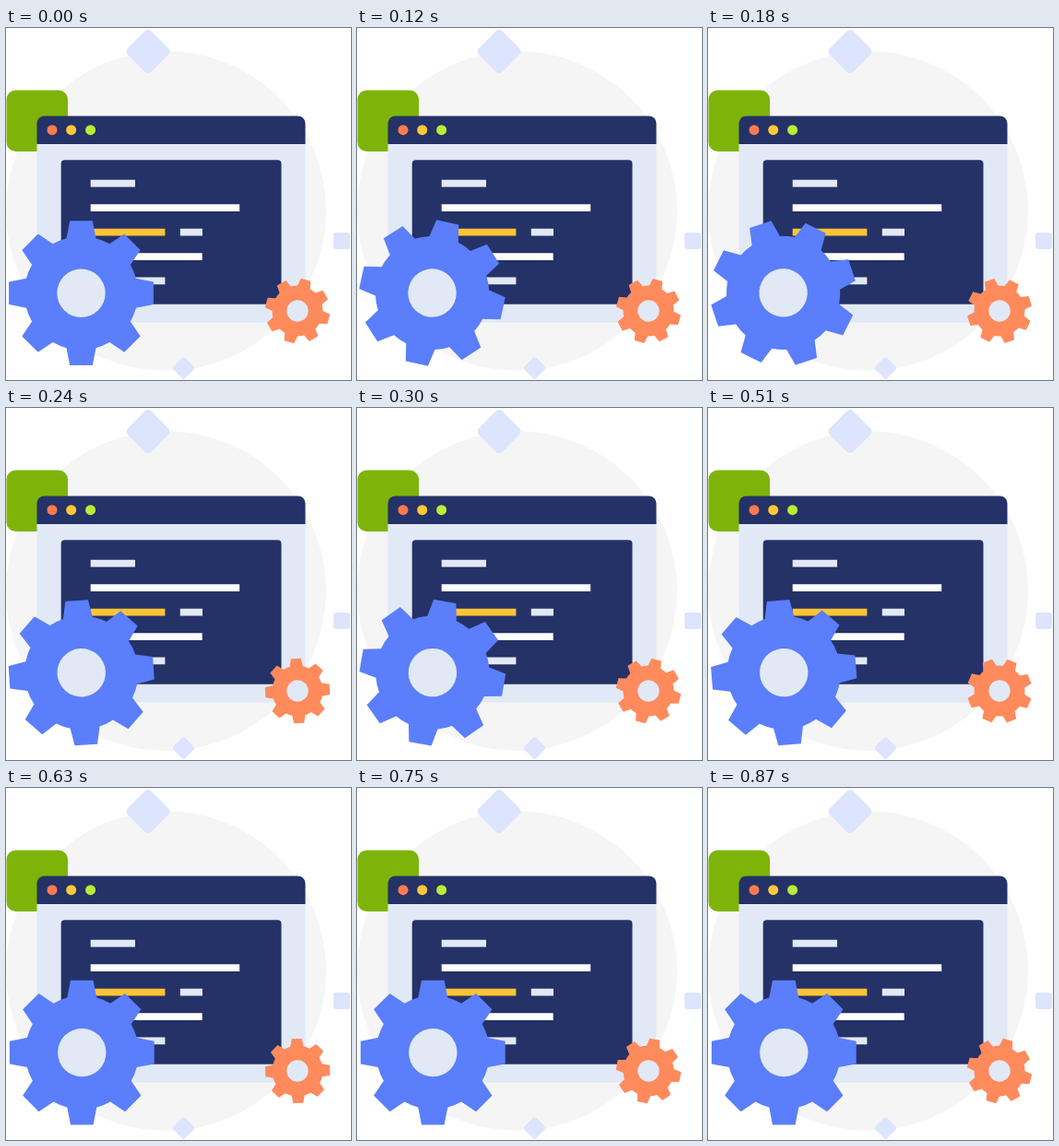
These frames come from a looping animation (374x382 px, 1200 ms). An HTML page:

```html
<!DOCTYPE html>
<html lang="en">
<head>
<meta charset="utf-8">
<title>Code window with gears</title>
<style>
  html, body { margin: 0; width: 100%; height: 100%; overflow: hidden; background: #fff; }
  svg { display: block; width: 100%; height: 100%; }
</style>
</head>
<body>
<svg viewBox="0 0 374 382">
  <circle cx="173.5" cy="198.5" r="173.5" fill="#f5f5f5"/>
  <g fill="#dce4fe">
    <rect x="-18" y="-18" width="36" height="36" rx="5" transform="translate(154 25.5) rotate(45)"/>
    <rect x="-9" y="-9" width="18" height="18" rx="2.5" transform="translate(192.5 369) rotate(45)"/>
    <rect x="355" y="222" width="18" height="18" rx="3"/>
  </g>
  <rect x="0.5" y="67.5" width="66.5" height="66.5" rx="10" fill="#7eb40a"/>

  <path d="M33.5 125h291v194.500h-291z" fill="#e2e9f6"/>
  <path d="M33.500 126v-22.500a8 8 0 0 1 8-8h275a8 8 0 0 1 8 8v22.500z" fill="#253267"/>
  <circle cx="50" cy="110.700" r="5.500" fill="#ff7a50"/>
  <circle cx="70.700" cy="110.700" r="5.500" fill="#ffc936"/>
  <circle cx="91.600" cy="110.700" r="5.500" fill="#b9ec38"/>
  <rect x="59.700" y="143.300" width="238.800" height="156.500" rx="4" fill="#253267"/>

  <path d="M91.700 164.800h48.300v7.700h-48.300z M188.800 217.800h24.200v7.700h-24.200z M91.700 270.600h80.700v7.700h-80.700z" fill="#e2e9f6"/>
  <path d="M91.700 191.300h161.500v7.700h-161.500z M91.700 244.200h121v7.700h-121z" fill="#fff"/>
  <path d="M91.700 217.800h80.700v7.700h-80.700z" fill="#fec434"/>

  <defs>
    <g id="gear">
      <path id="outline"/>
      <circle r="26.200" fill="#e2e9f6"/>
    </g>
  </defs>
  <g id="big" fill="#5a7efc"><use href="#gear" x="-0.700" y="-0.100"/></g>
  <g id="small" fill="#ff8a5c"><use href="#gear"/></g>
</svg>
<script>
const LOOP = 1200, STEP = 30;
const TEETH = 8, BODY = 61.6;
const TOOTH = [[-16, -59.5], [-12.3, -78.4], [12.3, -78.4], [16, -59.5]];
const $ = id => document.getElementById(id);

function gearPath() {
  let d = '';
  for (let i = 0; i < TEETH; i++) {
    const a = i * 2 * Math.PI / TEETH, c = Math.cos(a), s = Math.sin(a);
    TOOTH.forEach(([x, y], k) => {
      const cmd = k ? 'L' : i ? `A${BODY} ${BODY} 0 0 1 ` : 'M';
      d += `${cmd}${(x * c - y * s).toFixed(2)} ${(x * s + y * c).toFixed(2)}`;
    });
  }
  return d + `A${BODY} ${BODY} 0 0 1 ${TOOTH[0].join(' ')}Z`;
}

// cubic-bezier(.19, 0, .48, 1), solved by bisection
function ease(x) {
  if (x <= 0) return 0;
  if (x >= 1) return 1;
  let lo = 0, hi = 1, s;
  for (let i = 0; i < 24; i++) {
    s = (lo + hi) / 2;
    const bx = 0.57 * s * (1 - s) ** 2 + 1.44 * s * s * (1 - s) + s ** 3;
    if (bx < x) lo = s; else hi = s;
  }
  return s * s * (3 - 2 * s);
}

function draw() {
  const t = Math.floor(performance.now() % LOOP / STEP) * STEP;
  const big = 90 * ease((t - 30) / 600);
  const small = 15 + 135 * ease((t - 90) / 780);
  $('big').setAttribute('transform', `translate(82.2 287.8) rotate(${big})`);
  $('small').setAttribute('transform', `translate(316 307) rotate(${small}) scale(.446)`);
  requestAnimationFrame(draw);
}

$('outline').setAttribute('d', gearPath());
draw();
</script>
</body>
</html>
```
